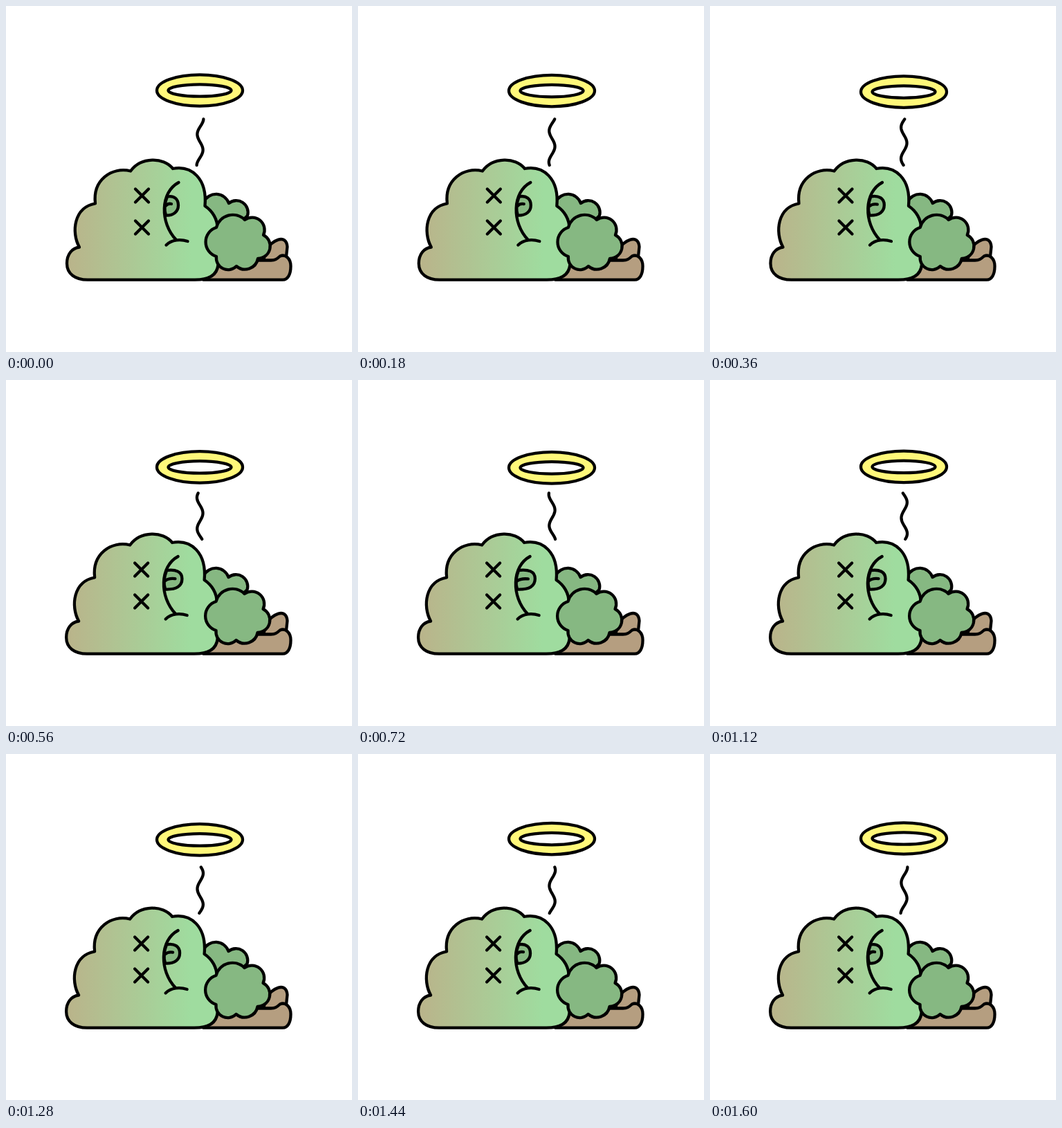
An HTML page for the animation above (1620 ms loop, 500 by 500 pixels).

```html
<!DOCTYPE html>
<html lang="en">
<head>
<meta charset="utf-8">
<title>Fallen tree</title>
<style>
  html, body { margin: 0; width: 100%; height: 100%; overflow: hidden; background: #fff; }
  svg { display: block; width: 100vw; height: 100vh; }
  .ink { stroke: #000; stroke-width: 4.3; stroke-linecap: round; stroke-linejoin: round; }
  .line { fill: none; }
  .wood { fill: #b59e80; }
  .leaf { fill: #86b882; }
</style>
</head>
<body>
<svg viewBox="0 0 500 500">
  <defs>
    <linearGradient id="fade" gradientUnits="userSpaceOnUse" x1="95" y1="0" x2="268" y2="0">
      <stop offset="0" stop-color="#b9b58b"/>
      <stop offset="1" stop-color="#9fdc9f"/>
    </linearGradient>
  </defs>

  <g class="ink">
    <g id="halo">
      <ellipse cx="280" cy="122" rx="62" ry="22.7" fill="#fff87a"/>
      <ellipse cx="280" cy="122" rx="45.5" ry="8.7" fill="#fff"/>
    </g>
    <path id="smoke" class="line"/>

    <g class="wood">
      <path d="M376 352C384 339 405 328 406.500 348L405 362V368H372Z"/>
      <path d="M285 395.700H400C407 395.700 411.500 388 411.500 376C411.500 365 404 358 396 361.500C391 366 389 367.500 383 367.500H285Z"/>
    </g>

    <g id="bush" class="leaf">
      <path d="M286 283A19.500 19.500 0 0 1 322 285A17 17 0 0 1 349 303L310 340L285 330Z"/>
    </g>

    <g id="head">
      <path fill="url(#fade)" d="M118 395.700C100 395.700 88 387 88 372C88 359 95 350 106 348.500C94 327 98 291 129 285.500C125 251 153 232 180 238.500C195 218 228 218 241 235C268 230 291 249 287.500 289C298 296 306 308 305.500 322L306.500 374C305 389 293 395.700 273 395.700Z"/>
      <path class="line" d="M187 264.500L206 283.500M206 264.500L187 283.500M187 310.500L206 329.500M206 310.500L187 329.500"/>
      <path id="tongue" class="leaf"/>
      <path id="groove" class="line"/>
      <path class="line" d="M249.500 255C223 269 222 313 246 338M231.500 345.500C240 337 253 337 262.500 340"/>
    </g>

    <path id="front" class="leaf" d="M304 320A24.500 24.500 0 0 1 345 309A18 18 0 0 1 372 331A18 18 0 0 1 364 365A19 19 0 0 1 333 376A17 17 0 0 1 304 362A22 22 0 0 1 304 320Z"/>
  </g>
</svg>
<script>
  const LOOP = 1620, TAU = Math.PI * 2;
  const [halo, smoke, tongue, groove, head, bush, front] =
    ["halo", "smoke", "tongue", "groove", "head", "bush", "front"].map(id => document.getElementById(id));
  const mix = (a, b, k) => (a + (b - a) * k).toFixed(2);
  const shift = (el, x, y) => el.setAttribute("transform", `translate(${x.toFixed(2)} ${y.toFixed(2)})`);
  const shape = (el, d) => el.setAttribute("d", d);

  // Wave climbing one wavelength per loop, slightly wider at both ends.
  function wave(p) {
    const points = [];
    for (let i = 0; i <= 48; i++) {
      const u = i / 48, edge = 2 * u - 1;
      const x = 280.5 + (4 + 0.9 * edge * edge) * Math.cos(TAU * (p + 1.5 * u));
      points.push(x.toFixed(2) + " " + (163.5 + 66.5 * u).toFixed(2));
    }
    return "M" + points.join("L");
  }

  function tongueShape(k) {
    const right = mix(249, 257, k), top = mix(275.5, 275, k);
    return `M233 ${top}C${mix(243, 247, k)} 273.5 ${right} ${mix(279, 276, k)} ${right} ${mix(288, 287, k)}`
      + `C${right} ${mix(297, 298, k)} ${mix(242, 249, k)} 303 231 302.5Q227 290 233 ${top}Z`;
  }

  const grooveShape = k =>
    `M231 ${mix(288.5, 290.5, k)}Q${mix(234, 236, k)} ${mix(285, 286.5, k)} ${mix(239, 247, k)} ${mix(286, 287.5, k)}`;

  function draw(ms) {
    const p = (ms % LOOP) / LOOP;
    const k = (1 - Math.cos(TAU * p)) / 2;
    const s = Math.min(p / 0.4, 1);
    const drift = -0.9 * s * s * (3 - 2 * s);
    shift(halo, 0, 5 * k);
    shift(head, drift, 0);
    shift(bush, drift / 2, 0);
    shift(front, drift / 2, 0);
    shape(smoke, wave(p));
    shape(tongue, tongueShape(k));
    shape(groove, grooveShape(k));
  }

  const start = performance.now();
  function tick() {
    draw(performance.now() - start);
    requestAnimationFrame(tick);
  }
  tick();
</script>
</body>
</html>
```
